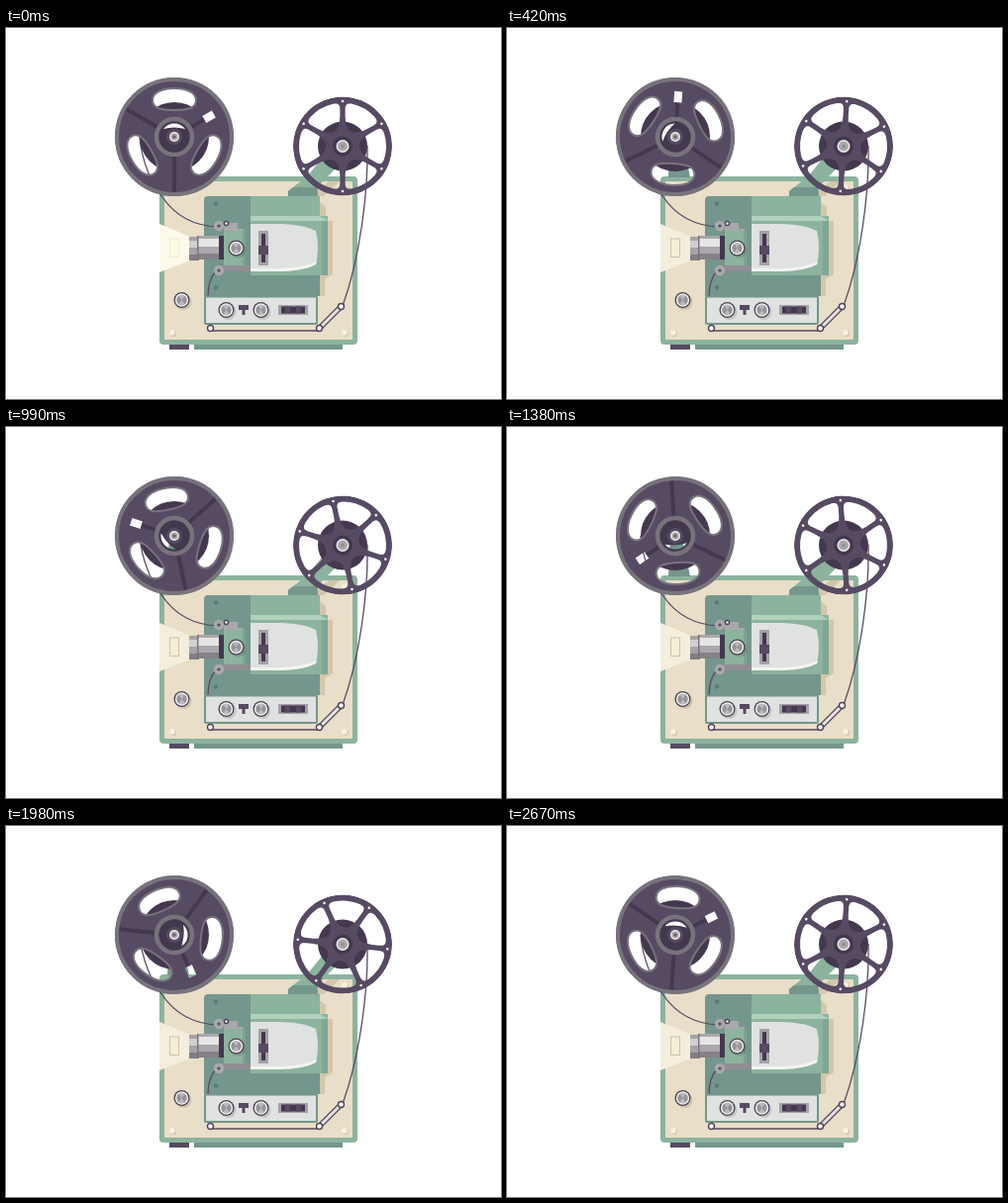
These frames come from a looping animation (500x375 px, 2700 ms). An HTML page:

```html
<!DOCTYPE html>
<html lang="en">
<head>
<meta charset="utf-8">
<title>Film projector</title>
<style>
  html, body { margin: 0; height: 100%; overflow: hidden; background: #fff; }
  svg { display: block; width: 100vw; height: 100vh; }
  .plum { fill: #574a63; }
  .dark { fill: #44384f; }
  .mint { fill: #8cb39e; }
  .teal { fill: #74968c; }
  .pale { fill: #dfe2e0; }
  .shade { fill: #d2c6ab; }
  .film { fill: none; stroke: #574a63; stroke-width: 1.3; }
  .pin { fill: #fff; stroke: #4d4357; stroke-width: 1.4; }
</style>
</head>
<body>
<svg viewBox="0 0 500 375">
  <defs>
    <path id="bean" d="M-22-37C-22-45-12-49 0-49S22-45 22-37C22-29 14-27 0-27S-22-29-22-37Z"/>
    <path id="moon" d="M-11-8A13.6 13.6 0 0 1 11-8Q0-11-11-8Z"/>
    <path id="petal" d="M17 0C17-6 22-9 27-12.5L33-16C38-19 40-18 42-13A44 44 0 0 1 42 13C40 18 38 19 33 16L27 12.5C22 9 17 6 17 0Z"/>
    <g id="beans">
      <use href="#bean"/>
      <use href="#bean" transform="rotate(120)"/>
      <use href="#bean" transform="rotate(240)"/>
    </g>
    <g id="knob">
      <circle cx="2" cy="2" r="8" fill="#000" opacity=".12"/>
      <circle r="8" fill="#4a4350"/>
      <circle r="6.7" fill="#f1f1ef"/>
      <circle r="5.2" fill="#96949a"/>
      <path d="M0 0L-3-4.2A5.2 5.2 0 0 1 3-4.2ZL3 4.2A5.2 5.2 0 0 1-3 4.2Z" fill="#bbb9bb"/>
    </g>
    <g id="screw">
      <circle cx="1" cy="1" r="3" class="shade"/>
      <circle r="2.7" fill="#f8f2e2"/>
    </g>
    <g id="roller">
      <circle r="5.2" fill="#aaa8ab"/>
      <circle r="1.6" fill="#574a63"/>
    </g>
    <mask id="supplyMask" maskUnits="userSpaceOnUse" x="-62" y="-62" width="124" height="124">
      <circle r="60" fill="#fff"/>
      <use href="#beans"/>
      <use href="#moon"/>
      <rect x="34" y="-4" width="12" height="8" transform="rotate(-30)"/>
    </mask>
    <mask id="takeupMask" maskUnits="userSpaceOnUse" x="-52" y="-52" width="104" height="104">
      <circle r="50" fill="#fff"/>
      <g id="petals"></g>
    </mask>
  </defs>

  <!-- case -->
  <rect x="165" y="319" width="20" height="6" class="plum"/>
  <rect x="190" y="319" width="150" height="6" class="teal"/>
  <rect x="155" y="150" width="200" height="170" rx="4" class="mint"/>
  <rect x="160" y="155" width="190" height="160" rx="1" fill="#e9dec8"/>
  <use href="#screw" x="168" y="308"/>
  <use href="#screw" x="342" y="308"/>
  <use href="#screw" x="342" y="161"/>

  <!-- reel arms -->
  <path d="M165 108H176L185 151H163Z" class="teal"/>
  <path d="M315 170V165L326 155H337L321 170Z" class="shade"/>
  <path d="M285 165L305 149L334 113L349 126L315 160V170H285Z" class="mint"/>
  <path d="M285 165L290 161H314L315 170H285Z" class="teal"/>

  <!-- housing -->
  <path d="M317 176L323 181V195H330V249L322 254V271H314V176Z" class="shade"/>
  <path d="M204 170H248V271H200V174Q200 170 204 170Z" class="teal"/>
  <circle cx="212" cy="177.500" r="2.200" fill="#587d76"/>
  <circle cx="212" cy="262.500" r="2.200" fill="#587d76"/>
  <rect x="247" y="170" width="70" height="21" class="mint"/>
  <rect x="247" y="249" width="70" height="22" class="teal"/>
  <rect x="247" y="190" width="78" height="60" class="mint"/>
  <path d="M247 190H317L325 195H247Z" fill="#b1d1bb"/>
  <rect x="319" y="195" width="6" height="55" fill="#7fa795"/>
  <path d="M247 198H278Q302 199 313 205Q317 222 313 239Q302 245 278 246H247Z" class="pale"/>
  <path d="M247 243H278Q300 242 314 236L313 239Q302 245 278 246H247Z" fill="#f3f4f2"/>
  <rect x="255" y="205" width="10" height="35" fill="#a4a1a7"/>
  <rect x="258" y="208" width="4" height="29" class="dark"/>
  <rect x="255" y="220" width="10" height="9" class="plum"/>

  <!-- beam -->
  <path id="beam" d="M155 198L186 211V235L155 247Z"/>
  <rect id="lamp" x="165.500" y="213" width="9" height="18.500"/>

  <!-- lens and gate -->
  <rect x="185" y="211" width="10" height="24" fill="#a6a3a6"/>
  <rect x="185" y="215" width="10" height="7" fill="#d0cecf"/>
  <rect x="185" y="229" width="10" height="6" fill="#827e84"/>
  <rect x="194" y="210" width="22" height="24" fill="#aaa8aa"/>
  <rect x="194" y="213" width="22" height="8" fill="#e5e5e4"/>
  <rect x="194" y="228" width="22" height="6" fill="#858187"/>
  <rect x="193" y="210" width="1.500" height="25" fill="#77737a"/>
  <rect x="215" y="210" width="5" height="24" class="dark"/>
  <path d="M213 240H247V246H219L213 249Z" fill="#918e94"/>
  <path d="M220 201L227 197H234V203H240V206H220Z" fill="#aaa8aa"/>
  <rect x="220" y="205" width="22" height="35" class="mint"/>
  <rect x="239" y="205" width="3" height="35" fill="#7ca491"/>
  <use href="#knob" x="232.500" y="222.500"/>
  <use href="#knob" x="177.500" y="275"/>

  <!-- film path -->
  <path class="film" d="M135 110C137 134 147 158 158 171C171 190 190 200 214 201M211 247C206 253 204 262 204 272M206 306H316"/>
  <path class="film" d="M365 119C366 168 357 234 340 281"/>
  <use href="#roller" x="215" y="200"/>
  <use href="#roller" x="215" y="245"/>
  <circle cx="222.500" cy="197.500" r="2" class="pin"/>

  <!-- control panel -->
  <rect x="201" y="271.500" width="113" height="27.500" rx="1" class="pale" stroke="#74968c" stroke-width="2"/>
  <use href="#knob" x="222.500" y="285"/>
  <use href="#knob" x="257.500" y="285"/>
  <path d="M235 280H245V285H241.500V290H238.500V285H235Z" class="plum"/>
  <rect x="275" y="280" width="30" height="10" fill="#a4a1a7"/>
  <rect x="278" y="281.500" width="24" height="7" class="dark"/>
  <path d="M282 281.500H287V288.500H282ZM293 281.500H298V288.500H293Z" class="plum"/>
  <path d="M316 304L338 282" stroke="#574a63" stroke-width="5.500"/>
  <path d="M316 304L338 282" stroke="#e9e4df" stroke-width="3"/>
  <circle cx="206.500" cy="303.500" r="3" class="pin"/>
  <circle cx="316.500" cy="303.500" r="3" class="pin"/>
  <circle cx="338.500" cy="281.500" r="3" class="pin"/>

  <!-- supply reel -->
  <g transform="translate(170 110)">
    <circle r="27" fill="none" stroke="#44384f" stroke-width="16"/>
    <g class="reel">
      <g mask="url(#supplyMask)">
        <circle r="60" class="plum"/>
        <path d="M0 20V56M-17.300-10L-48.500-28M17.300-10L39-22.500" stroke="#44384f" stroke-width="4"/>
        <circle r="17" class="dark"/>
        <circle r="8" class="plum"/>
      </g>
      <g fill="none" stroke="#77737b">
        <circle r="58" stroke-width="4"/>
        <circle r="18" stroke-width="4.500"/>
        <use href="#beans" stroke-width="2"/>
      </g>
    </g>
    <circle r="5" fill="#efefed"/>
    <circle r="3.600" fill="#aaa8aa"/>
    <circle r="1.700" fill="#67616c"/>
  </g>

  <!-- take-up reel -->
  <g transform="translate(340 119.500)">
    <circle r="25" class="dark"/>
    <g class="reel">
      <circle r="50" class="plum" mask="url(#takeupMask)"/>
      <g id="dots" fill="#fff"></g>
    </g>
    <circle r="10" class="dark"/>
    <circle r="6.500" fill="#efefed"/>
    <circle r="5" fill="#aaa8aa"/>
    <circle r="2" fill="#918e94"/>
  </g>
</svg>
<script>
  const LOOP = 2700, STEP = 30, FLICKER = 540;
  const $ = id => document.getElementById(id);
  const sixfold = draw => [0, 60, 120, 180, 240, 300].map(draw).join('');

  $('petals').innerHTML = sixfold(a => `<use href="#petal" transform="rotate(${a})"/>`);
  $('dots').innerHTML = sixfold(a => `<circle cy="-45.500" r="1.300" transform="rotate(${a})"/>`);

  const reels = document.querySelectorAll('.reel');
  const start = performance.now();

  function render(now) {
    const elapsed = Math.max(0, now - start) % LOOP;
    const t = Math.floor(elapsed / STEP) * STEP;
    const bright = t % FLICKER < FLICKER / 2;
    reels.forEach(r => r.setAttribute('transform', `rotate(${-360 * t / LOOP})`));
    $('beam').setAttribute('fill', bright ? '#fdfaec' : '#f4eedd');
    $('lamp').setAttribute('fill', bright ? '#fdf9e4' : '#f6efd6');
    $('lamp').setAttribute('stroke', bright ? '#f1ead0' : '#cdc2a4');
    requestAnimationFrame(render);
  }
  render(start);
</script>
</body>
</html>
```
